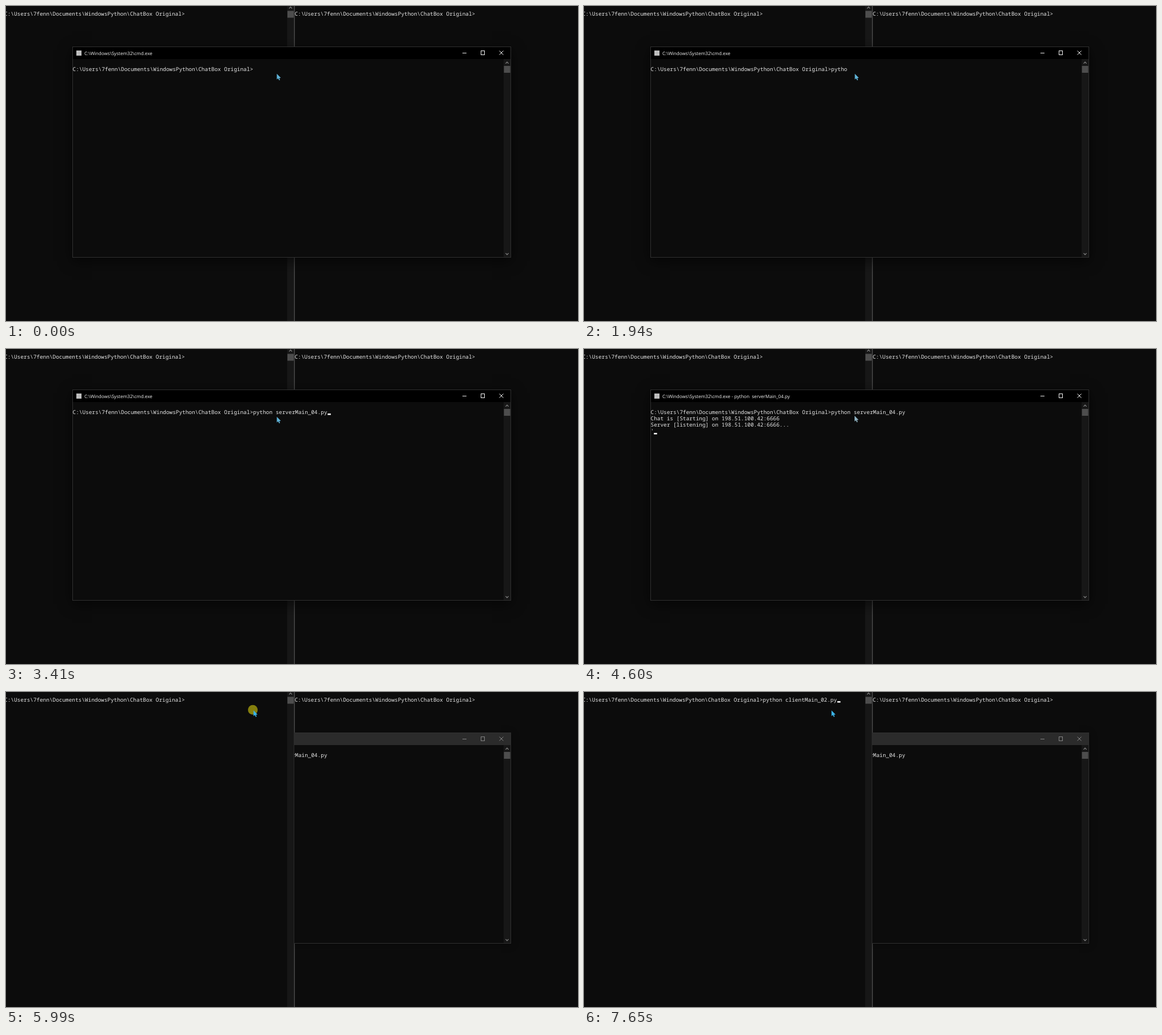
These frames come from a looping animation (1000 px wide and 552 px high, 8 s). An HTML page with a canvas:

```html
<!DOCTYPE html>
<html lang="en">
<head>
<meta charset="utf-8">
<title>Chat server and client</title>
<style>
  html, body { margin: 0; width: 100%; height: 100%; overflow: hidden; background: #0c0c0c; }
  canvas { display: block; }
</style>
</head>
<body>
<canvas id="stage" width="1000" height="552"></canvas>
<script>
const ctx = document.getElementById('stage').getContext('2d');
const LOOP = 8000, FOCUS_SWAP = 5990, CLICK_END = 6060;
const PITCH = 5.643, LINE = 11.3;
const PROMPT = 'C:\\Users\\7fenn\\Documents\\WindowsPython\\ChatBox Original>';
const SERVER = 'python serverMain_04.py';
const LOG = SERVER + '\nChat is [Starting] on 198.51.100.42:6666' +
  '\nServer [listening] on 198.51.100.42:6666...\n';

// Each step is [start time, typed text]; a trailing | shows the caret.
const serverSteps = [
  [0, ''], [330, 'p|'], [590, 'py|'], [860, 'pyt|'], [930, 'pyt'],
  [1130, 'pyth|'], [1200, 'pythob|'], [1270, 'pythob |'], [1470, 'pythob '],
  [1670, 'pythob|'], [1800, 'pytho|'], [1940, 'pytho'], [2010, 'python|'],
  [2140, 'python |'], [2210, 'python s|'], [2410, 'python se|'], [2480, 'python ser'],
  [2680, 'python serverMain.py|'], [3010, 'python serverMain_02.py|'],
  [3340, 'python serverMain_03.py|'], [3410, SERVER + '|'],
  [3800, SERVER + '\n|'], [3870, SERVER + "\n'|"], [4000, LOG + '|'], [4070, LOG + "'"],
  [4600, LOG + "'|"], [5120, LOG + '|'], [5250, LOG]
];
const clientSteps = [
  [0, ''], [6580, '|'], [6650, 'p|'], [6850, 'py|'], [6920, 'pyt|'], [7050, 'pyth|'],
  [7120, 'pytho|'], [7190, 'python|'], [7250, 'python |'], [7320, 'python c|'],
  [7450, 'python clientMain.py|'], [7650, 'python clientMain_02.py|']
];
// [start time, x, y, colour]
const pointerSteps = [
  [0, 473.5, 118.8, '#5fb3d8'], [4600, 473, 117, '#8eb0bf'], [4670, 473, 114, '#8eb0bf'],
  [4730, 473, 109, '#7ab2cc'], [4860, 473, 104.5, '#5fb3d8'], [5650, 468, 97, '#3eb6e6'],
  [5720, 458, 80, '#2cb9ec'], [5790, 446, 57, '#20bbf0'], [5860, 437, 40, '#1cbcf2'],
  [5950, 432.7, 32.3, '#1cbcf2'], [FOCUS_SWAP, 432.7, 32.3, '#3bb4e8']
];

const pick = (steps, t) => steps.findLast(s => s[0] <= t);

function rect(x, y, w, h, colour) {
  ctx.fillStyle = colour;
  ctx.fillRect(x, y, w, h);
}

function stroke(points, colour, width = 1) {
  ctx.strokeStyle = colour;
  ctx.lineWidth = width;
  ctx.beginPath();
  points.forEach(([x, y]) => ctx.lineTo(x, y));
  ctx.stroke();
}

function shell(x, y, typed) {
  const caret = typed.endsWith('|');
  const lines = (PROMPT + (caret ? typed.slice(0, -1) : typed)).split('\n');
  ctx.font = `${PITCH / 0.6}px "Noto Sans Mono", monospace`;
  ctx.fillStyle = '#e6e6e6';
  lines.forEach((line, i) => ctx.fillText(line, x, y + i * LINE));
  if (caret) {
    const last = lines.length - 1;
    rect(x + lines[last].length * PITCH, Math.round(y + last * LINE - 0.4), 5.6, 2.6, '#f2f2f2');
  }
}

function chevron(x, y, dir) {
  stroke([[x - 2.5, y + dir * 1.3], [x, y - dir * 1.3], [x + 2.5, y + dir * 1.3]], '#8a8a8a', 1.2);
}

function scrollbar(x, top, bottom) {
  rect(x, top, 12, bottom - top, '#171717');
  rect(x + 0.5, top + 12, 11, 12, '#4d4d4d');
  chevron(x + 6, top + 6.5, 1);
  if (bottom < 552) chevron(x + 6, bottom - 5.5, -1);
}

function leftWindow(t) {
  rect(0, 0, 504, 552, '#0c0c0c');
  scrollbar(491.5, -3.5, 556);
  rect(503, 0, 1, 552, '#2c2c2c');
  shell(-3, 16.8, pick(clientSteps, t)[1]);
}

function rightWindow() {
  rect(504, 0, 496, 552, '#0c0c0c');
  rect(504, 0, 1, 552, '#4a4a4a');
  shell(504.7, 16.8, '');
}

function serverWindow(t) {
  const active = t < FOCUS_SWAP;
  const ink = active ? '#f4f4f4' : '#858585';
  ctx.save();
  ctx.shadowColor = `rgba(0,0,0,${active ? 0.6 : 0.35})`;
  ctx.shadowBlur = active ? 22 : 12;
  ctx.shadowOffsetY = active ? 6 : 2;
  rect(116, 71, 767, 370, '#303030');
  ctx.restore();
  rect(117, 72, 765, 21, active ? '#000' : '#2b2b2b');
  rect(117, 93, 765, 347, '#0c0c0c');
  scrollbar(870, 93, 440);

  rect(123, 78, 9, 9, '#bdbdbd');
  ctx.font = '8.12px "Open Sans", sans-serif';
  ctx.fillStyle = ink;
  ctx.fillText('C:\\Windows\\System32\\cmd.exe' + (t < 3870 ? '' : ' - python  serverMain_04.py'), 137, 85.5);

  rect(798, 82, 7, 1, ink);
  ctx.strokeStyle = ink;
  ctx.lineWidth = 1;
  ctx.strokeRect(830.5, 78.5, 6, 7);
  stroke([[862.5, 78.5], [869.5, 85.5]], ink);
  stroke([[869.5, 78.5], [862.5, 85.5]], ink);
  shell(116.5, 113.5, pick(serverSteps, t)[1]);
}

function pointer(t) {
  if (t >= FOCUS_SWAP && t < CLICK_END) {
    ctx.fillStyle = '#857f0d';
    ctx.beginPath();
    ctx.arc(431.5, 31.2, 8.5, 0, 7);
    ctx.fill();
  }
  const [, x, y, colour] = pick(pointerSteps, t);
  ctx.save();
  ctx.translate(x, y);
  ctx.fillStyle = colour;
  ctx.fill(new Path2D('M0 0V10L2.3 8 4 11.5 5.6 10.8 4.1 7.6 7 7.3Z'));
  ctx.restore();
}

function draw(now) {
  const t = now % LOOP;
  ctx.textRendering = 'geometricPrecision';
  if (t < FOCUS_SWAP) {
    leftWindow(t);
    rightWindow();
    serverWindow(t);
  } else {
    rightWindow();
    serverWindow(t);
    leftWindow(t);
  }
  pointer(t);
}

const start = performance.now();
function tick() {
  draw(performance.now() - start);
  requestAnimationFrame(tick);
}
tick();
</script>
</body>
</html>
```
